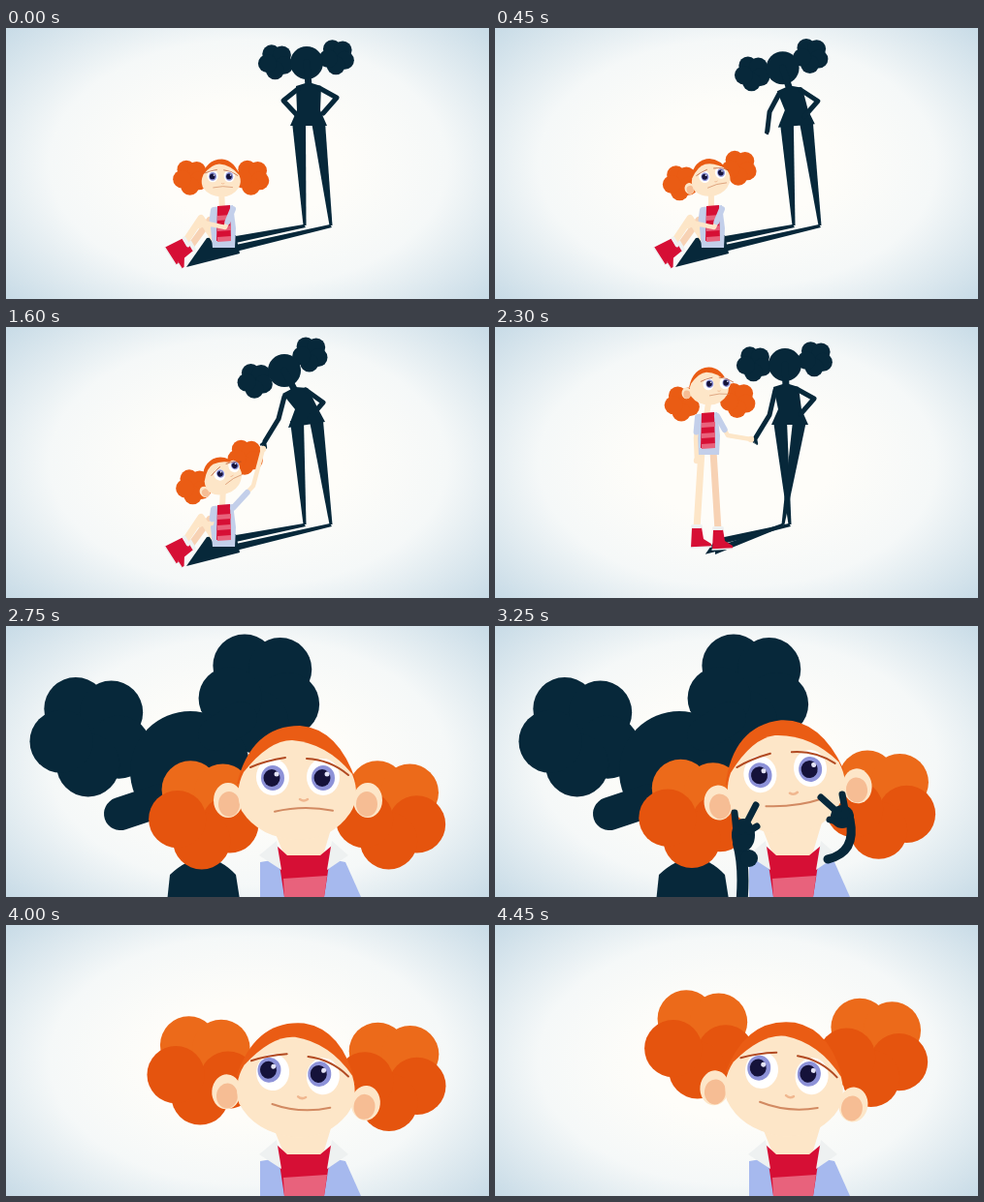
Animation, 498 px wide and 280 px high, one loop 4500 ms. Source, as an HTML page with a canvas:

```html
<!DOCTYPE html>
<html lang="en">
<head>
<meta charset="utf-8">
<title>Girl and shadow</title>
<style>
  html, body { margin: 0; width: 100%; height: 100%; overflow: hidden; background: #fff; }
  canvas { display: block; width: 498px; height: 280px; }
</style>
</head>
<body>
<canvas width="498" height="280"></canvas>
<script>
const c = document.querySelector('canvas').getContext('2d');
const LOOP = 4500, STEP = 50, CUT = 2700, SMALL = .32;
const DARK = '#07283a', SKIN = '#fde6c8', HAIR = '#ea5c14', BACK = '#ec6a1a', FRONT = '#e5540e',
      RED = '#d60f35', PINK = '#e8627c', DENIM = '#c3cfea', BLUE = '#a6b9ee', WHITE = '#eef1f1';

// Eased progress 0..1 between two times
function ramp(t, from, to) {
  const u = Math.min(1, Math.max(0, (t - from) / (to - from)));
  return u * u * (3 - 2 * u);
}
const mix = (a, b, u) => a + (b - a) * u;

function poly(color, ...p) {
  c.fillStyle = color;
  c.beginPath();
  for (let i = 0; i < p.length; i += 2) c.lineTo(p[i], p[i + 1]);
  c.fill();
}

function line(color, w, ...p) {
  stroke(color, w, 'M' + p.join(' '));
}

function oval(color, x, y, rx, ry = rx) {
  c.fillStyle = color;
  c.beginPath();
  c.ellipse(x, y, rx, ry, 0, 0, 7);
  c.fill();
}

function shape(color, d) {
  c.fillStyle = color;
  c.fill(new Path2D(d));
}

function stroke(color, w, d) {
  c.strokeStyle = color;
  c.lineWidth = w;
  c.lineCap = c.lineJoin = 'round';
  c.stroke(new Path2D(d));
}

function at(x, y, rot, s, draw) {
  c.save();
  c.translate(x, y);
  c.rotate(rot);
  c.scale(s, s);
  draw();
  c.restore();
}

// Two five-lobed clouds of hair, each `spread` away from the top of the head
function puffs(x, y, s, tilt, spread, color, low = color) {
  const r = 57 * s;
  for (const a of [tilt - spread, tilt + spread]) {
    const px = x + Math.sin(a) * 99 * s, py = y - Math.cos(a) * 99 * s;
    oval(color, px, py, r * .6);
    for (let i = 0; i < 5; i++) {
      const b = -2.1 + i * Math.PI * .4;
      oval(i < 2 ? color : low, px + Math.cos(b) * r * .5, py + Math.sin(b) * r * .5, r * .52);
    }
  }
}

function backdrop() {
  c.fillStyle = '#fff';
  c.fillRect(0, 0, 498, 280);
  at(250, 140, 0, 1, () => {
    c.scale(1.6, 1);
    const g = c.createRadialGradient(0, 0, 60, 0, 0, 212);
    g.addColorStop(0, '#fefdf9');
    g.addColorStop(.45, '#f5f8f8');
    g.addColorStop(1, '#c6dae6');
    c.fillStyle = g;
    c.fillRect(-200, -140, 400, 280);
  });
}

// turn shifts the features; lx, ly move the gaze; smile bends the mouth
function face(x, y, rot, s, turn, lx, ly, smile, ears) {
  at(x, y, rot, s, () => {
    shape(HAIR, 'M-63 -8Q-48 -68 2 -68Q42 -65 60 -10Z');
    for (const side of ears) {
      oval(SKIN, side * 72, 9, 15, 18);
      oval('#f6bd94', side * 71, 13, 11, 13);
    }
    shape(SKIN, 'M-56 -20Q-30 -53 -6 -53Q30 -50 56 -18Q65 5 54 22Q35 50 0 50Q-40 48 -58 20Q-66 0 -56 -20');
    c.translate(turn, 0);
    for (const ex of [-27, 25]) {
      oval('#fff', ex, -15, 17, 19);
      oval('#8d92d8', ex + lx, -14 + ly, 12, 13);
      oval('#15123a', ex + lx - 1, -14 + ly, 8.5, 9);
      oval('#e4e4f8', ex + lx + 4, -18 + ly, 2.5);
    }
    stroke('#b24a22', 2, 'M-50 -25Q-34 -32 -14 -35M8 -34Q32 -33 51 -17');
    stroke('#f0b78f', 2.5, 'M1 8Q5 11 9 8');
    stroke('#d28a62', 2, `M-25 ${19 - smile * 3}Q5 ${21 + smile * 12} 35 ${18 - smile * 3}`);
  });
}

function tallShadow(t) {
  const reach = ramp(t, 200, 650), stand = ramp(t, 1700, 2150), lean = reach - stand;
  const hx = 310 - 23 * lean - 11 * stand, hy = 36 + 9 * lean + 3 * stand;
  const sx = 312 - 14 * lean - 12 * stand, sy = 60 + 6 * lean + 2 * stand;
  const px = 312 - 2 * lean - 8 * stand, py = 101, slant = 3 * lean;
  const gx = 237 - 10 * stand, gy = 218 + 4 * stand;
  at(219 + 11 * stand, 230 - 2 * stand, 0, 1 - .6 * stand, () =>
    poly(DARK, -33, 17, -12, -13, 18, -16, 22, 3));

  // Legs run on into their strips on the ground
  for (const side of [-1, 1]) {
    const hip = px + side * 10, right = (side + 1) / 2;
    const foot = mix(308 - 4 * stand, 335 - 38 * stand, right), ground = gy + right * 9;
    poly(DARK, foot - 1, 203, foot + 1, 206, gx, ground + 4, gx, ground - 3);
    poly(DARK, hip - 7, py - 4, hip + 7, py - 4, foot + 1.5, 204, foot - 1.5, 204);
  }
  puffs(hx, hy, SMALL, -.08 - .37 * lean, 1.45, DARK);
  oval(DARK, hx, hy, 17);
  line(DARK, 7, hx, hy, sx, sy);
  poly(DARK, sx - 13, sy + slant, sx, sy - 4, sx + 13, sy - slant,
    px + 12, py - 16, px + 19, py - slant, px - 19, py + slant, px - 12, py - 16);
  const mx = sx - 12 - 19 * reach, my = sy + 30 + 22 * reach;
  line(DARK, 5, sx - 11, sy + 3 + slant, sx - 26 + 9 * reach, sy + 15 + 14 * reach, mx, my);
  line(DARK, 5, sx + 11, sy + 2 - slant, sx + 29, sy + 12, sx + 15, sy + 28);
  const open = ramp(t, 350, 650) - .4 * ramp(t, 1350, 1500);
  if (open) for (let i = 0; i < 4; i++)
    line(DARK, 2, mx, my, mx + (-7 + 3 * i) * open, my + (6 + i * 1.8) * open);
}

function boot(x, y, rot) {
  at(x, y, rot, 1, () => {
    poly(RED, -5, 0, 5, -1, 7, 11, 15, 16, 15, 19, -6, 20);
    line(WHITE, 1.4, -6, 20, 15, 19);
    line(WHITE, 4, -4, -2, 4, -2);
  });
}

function arm(x, y, ex, ey, hx, hy) {
  line(SKIN, 4.5, x, y, x + ex, y + ey, x + hx, y + hy);
  line(DENIM, 6, x, y, x + ex * .7, y + ey * .7);
  oval(SKIN, x + hx, y + hy, 3.2);
}

function girl(t) {
  const look = ramp(t, 250, 700), raise = ramp(t, 1050, 1450), stand = ramp(t, 1700, 2150);
  const hx = 222 + 2 * look - 3 * stand, hy = 158 - 2 * look - 92 * stand;
  const rot = -.6 * look + .08 * raise + .46 * stand;
  const bx = 224 - 5 * stand, by = 183 - 95 * stand;

  puffs(hx, hy, SMALL, rot, 1.45 - .12 * look + .67 * stand, HAIR);
  for (const leg of [1, 0]) {
    const hip = bx - 6 + 12 * leg, hipY = by + 40;
    const fx = 184 + 24 * stand + leg * (6 + 16 * stand), fy = 222 - 14 * stand + leg * (4 - 2 * stand);
    line(leg ? '#f7d2b4' : SKIN, 7, hip, hipY,
      (hip + fx) / 2, (hipY + fy) / 2 - 26 * (1 - stand), fx, fy);
    boot(fx, fy, 1.05 * (1 - stand));
  }
  line(SKIN, 6, bx - 1, by + 4, hx, hy + 8);
  at(bx, by, 0, 1, () => {
    poly(DENIM, -10, 2, 10, 0, 13, 24, 12, 44, -11, 44, -13, 24);
    poly(RED, -6, 1, 7, 0, 8, 36, -7, 37);
    for (let y = 11; y < 35; y += 11) poly(PINK, -6, y, 8, y - 1, 8, y + 4, -6, y + 5);
  });
  const limb = (sit, up, tall) => mix(mix(sit, up, raise), tall, stand);
  arm(bx - 10, by + 5, -2, mix(15, 22, stand), mix(-15, -1, stand), mix(16, 45, stand));
  arm(bx + 10, by + 4, limb(-8, 21, 11), limb(19, -23, 20), limb(-31, 31, 35), limb(14, -61, 24));
  face(hx, hy, rot, .33, 22 * look + 3 * stand, 4 * look, -2 * look, -.6, look > .4 ? [-1] : []);
}

function bigShadow(t, happy) {
  const gone = ramp(t, 3750, 4050), s = 1 - .75 * gone;
  if (gone == 1) return;
  shape(DARK, `M165 ${295 + 60 * gone}l4 -38q36 -34 68 0l6 38z`);
  at(mix(190 + 8 * happy, 300, gone), mix(150, 175, gone), 0, s, () => {
    puffs(0, 0, 1.1, -.25 + .1 * happy, .97, DARK);
    oval(DARK, 0, 0, 62);
    line(DARK, 34, 25, -38, 52, -55);
    line(DARK, 34, -72, 44, -30, 30);
  });
}

function hands(t) {
  const out = 125 * (1 - ramp(t, 2800, 3100) + ramp(t, 3350, 3550));
  if (out > 120) return;
  at(-out * .2, out, 0, 1, () => {
    stroke(DARK, 12, 'M254 290Q258 250 251 225');
    oval(DARK, 256, 216, 12, 17);
    oval(DARK, 262, 240, 9);
    stroke(DARK, 7, 'M255 212L269 185M249 214L247 193M262 212L270 207');
  });
  at(out * .2, out, 0, 1, () => {
    stroke(DARK, 9, 'M343 241Q373 234 366 200');
    oval(DARK, 358, 197, 12);
    stroke(DARK, 7, 'M356 195L336 177M362 195L358 174M352 202L345 200');
  });
}

function closeUp(t) {
  const push = ramp(t, 2900, 3150), happy = ramp(t, 3350, 3600), up = ramp(t, 3800, 4150);
  const hx = 301 - 2 * up, hy = 171 - 6 * push + 6 * happy - 3 * up;
  const rot = -.12 * push + .14 * happy + .1 * up;
  bigShadow(t, happy);
  puffs(hx, hy, 1, rot * .4, 1.8 - .67 * up, BACK, FRONT);

  poly(BLUE, 262, 244, 286, 240, 287, 280, 262, 280);
  poly(BLUE, 330, 240, 350, 244, 366, 280, 328, 280);
  poly(SKIN, 272, 200, 338, 200, 326, 240, 288, 240);
  poly(RED, 279, 227, 290, 237, 324, 237, 336, 227, 328, 280, 287, 280);
  poly(PINK, 286, 261, 331, 258, 328, 280, 287, 280);
  poly(WHITE, 279, 222, 261, 237, 284, 252);
  poly(WHITE, 336, 222, 353, 237, 331, 252);
  face(hx, hy, rot, 1, 1, -5 * happy + 2 * up, -3 * happy, -.6 + .8 * push + .2 * happy, [-1, 1]);
  hands(t);
}

function frame(now) {
  const t = Math.floor(now % LOOP / STEP) * STEP;
  backdrop();
  if (t < CUT) {
    tallShadow(t);
    girl(t);
  } else closeUp(t);
}

const start = performance.now();
(function tick() {
  frame(performance.now() - start);
  requestAnimationFrame(tick);
})();
</script>
</body>
</html>
```
